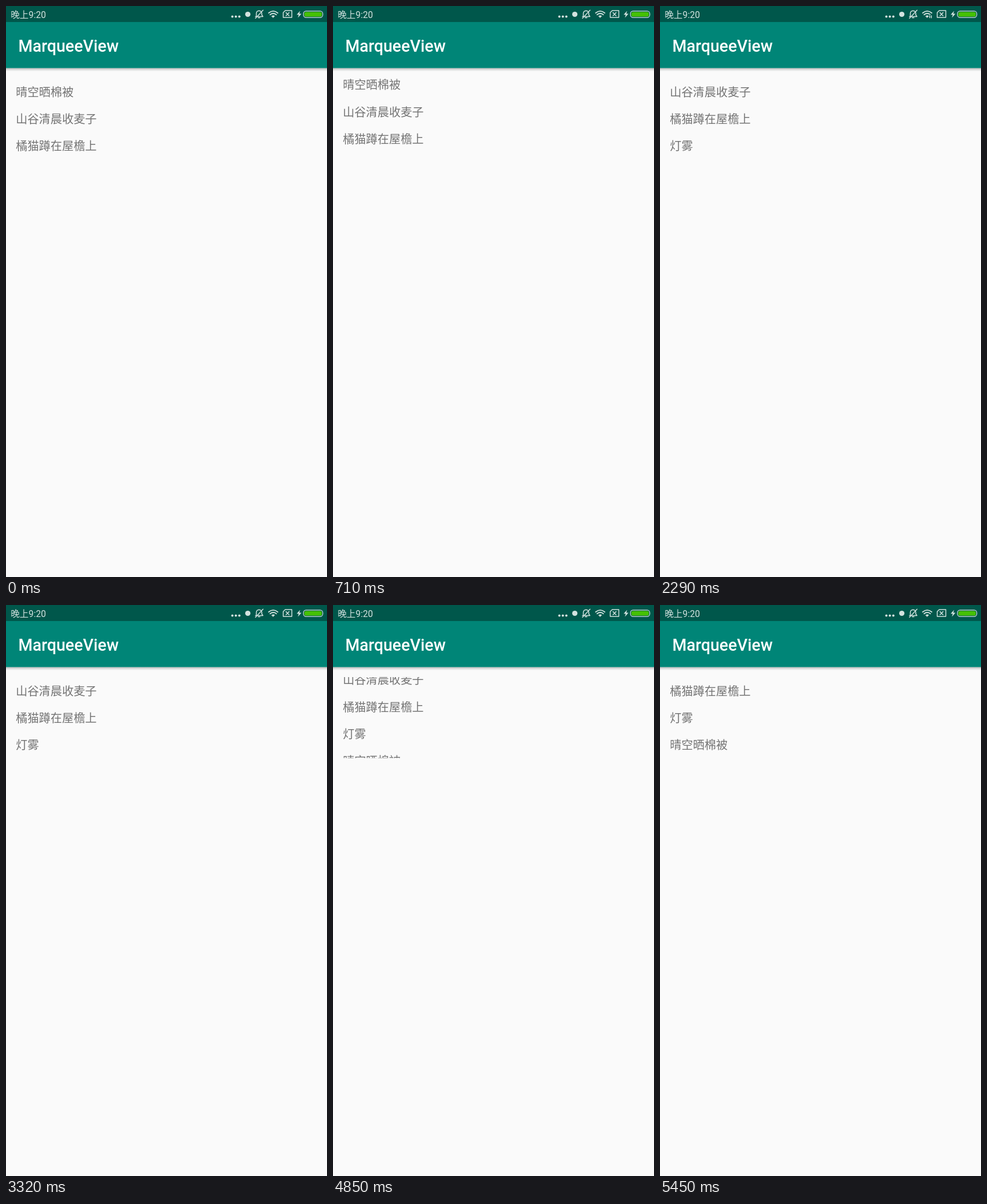
Recreate the animation shown at these times as an HTML page. Size 561 px wide and 998 px high, loop 8 s.

```html
<!DOCTYPE html>
<html lang="zh">
<head>
<meta charset="utf-8">
<title>MarqueeView</title>
<style>
  html, body { margin: 0; width: 100%; height: 100%; overflow: hidden; background: #fafafa; }
  svg { display: block; width: 100vw; height: 100vh; }
  text { white-space: pre; }
  .clock { font: 15.7px Roboto, "Noto Sans CJK SC", "Noto Sans CJK", sans-serif; fill: #d3e2df; }
  .title { font: 500 28.6px Roboto, sans-serif; fill: #fff; }
  .row { font: 20.2px "Noto Sans CJK SC", "Noto Sans CJK", sans-serif; fill: #737373; }
  .line { fill: none; stroke: #d3e2df; stroke-width: 1.5; stroke-linecap: round; stroke-linejoin: round; }
  .solid { fill: #d3e2df; }
</style>
</head>
<body>
<svg viewBox="0 0 561 998" preserveAspectRatio="none">
  <defs>
    <linearGradient id="shade" x1="0" y1="0" x2="0" y2="1">
      <stop offset="0" stop-color="#000" stop-opacity=".3"/>
      <stop offset=".4" stop-color="#000" stop-opacity=".12"/>
      <stop offset="1" stop-color="#000" stop-opacity="0"/>
    </linearGradient>
    <clipPath id="window"><rect x="17" y="126" width="527" height="141.5"/></clipPath>
  </defs>

  <rect width="561" height="998" fill="#fafafa"/>
  <rect y="108.5" width="561" height="6" fill="url(#shade)"/>
  <rect width="561" height="108.5" fill="#008577"/>
  <rect width="561" height="28" fill="#00574b"/>
  <text class="clock" x="8.2" y="20.6">晚上9:20</text>
  <text class="title" x="21.4" y="80">MarqueeView</text>

  <!-- status icons -->
  <g class="solid">
    <circle cx="395.6" cy="18.6" r="2"/>
    <circle cx="401.7" cy="18.6" r="2"/>
    <circle cx="407.8" cy="18.6" r="2"/>
    <circle cx="422.6" cy="14.5" r="4.6"/>
    <path d="M514 8.5L508 15.2H511.6L510.2 20.5L516.4 13.4H512.6Z"/>
  </g>
  <g class="line">
    <path d="M437.5 18.2V12.5Q438 8.5 442.2 8.2Q446.5 8.5 447 12.5V15.5L449 18.4H436M440.8 20.6H443.8M436 21.5L449.3 7.2"/>
    <path d="M459 12.2Q467 5.6 475 12.2M461.5 15.2Q467 10.9 472.5 15.2" stroke-width="1.8"/>
    <path d="M464.4 17.6Q467 15.7 469.6 17.6L467 20.2Z" fill="#d3e2df" stroke-width=".8"/>
    <path d="M488 8H499.5V20H484.5V11.5ZM489.3 11.6L494.7 17M494.7 11.6L489.3 17"/>
  </g>
  <g id="traffic">
    <rect x="469.6" y="15.2" width="6.6" height="6.6" fill="#00574b"/>
    <path class="line" stroke-width="1.2" d="M471.4 20.5V16.8M474.3 17V20.7"/>
  </g>
  <rect x="519.8" y="8.8" width="33.8" height="11.4" rx="4.6" fill="none" stroke="#d3e2df" stroke-width="1.2"/>
  <rect x="521.4" y="10.4" width="30.6" height="8.2" rx="3.2" fill="#45c005"/>

  <g clip-path="url(#window)"><g id="list"></g></g>
</svg>
<script>
  const LOOP = 8000, ROW = 47.33, STEP = 1150 / 21;
  const DELAY = 80, GLIDE = 1050;
  const scrollStarts = [270, 4300];
  const lines = ['晴空晒棉被', '山谷清晨收麦子', '橘猫蹲在屋檐上', '灯雾'];
  const list = document.getElementById('list');
  const traffic = document.getElementById('traffic');

  for (let i = 0; i < 5; i++) {
    const text = document.createElementNS('http://www.w3.org/2000/svg', 'text');
    text.setAttribute('class', 'row');
    text.setAttribute('x', 17.2);
    text.setAttribute('y', 157.8 + i * ROW);
    text.textContent = lines[i % lines.length];
    list.append(text);
  }

  function progress(elapsed) {
    const held = Math.floor((elapsed + 5) / STEP) * STEP;
    const p = Math.min(1, Math.max(0, (held - DELAY) / GLIDE));
    return (1 - Math.cos(Math.PI * p)) / 2;
  }

  function draw(t) {
    const rows = scrollStarts.reduce((sum, start) => sum + progress(t - start), 0);
    list.setAttribute('transform', `translate(0 ${(-rows * ROW).toFixed(2)})`);
    traffic.setAttribute('visibility', t >= 2290 && t < 3320 ? 'visible' : 'hidden');
  }

  const origin = performance.now();
  function tick() {
    draw((performance.now() - origin) % LOOP);
    requestAnimationFrame(tick);
  }
  tick();
</script>
</body>
</html>
```
